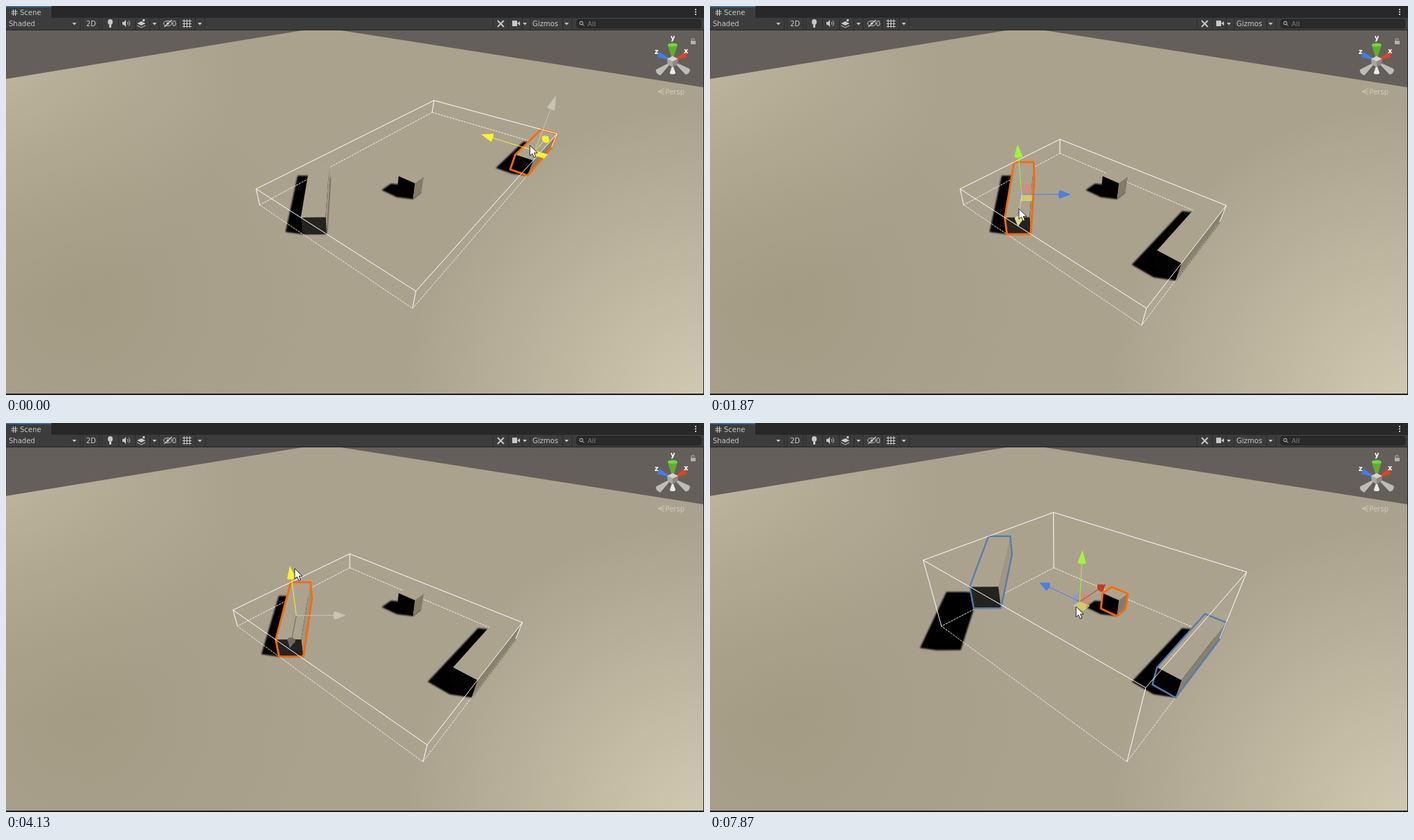
Write an HTML page with a canvas that moves like this. It is 1001 px wide and 559 px high and loops after 8 s.

```html
<!DOCTYPE html>
<html>
<head>
<meta charset="utf-8">
<style>
html, body { margin: 0; width: 100%; height: 100%; overflow: hidden; background: #282828; }
canvas { display: block; }
</style>
</head>
<body>
<canvas id="stage" width="1001" height="559"></canvas>
<script>
const W = 1001, H = 559, LOOP = 8000, STEP = 200 / 3;
const ctx = document.getElementById('stage').getContext('2d');
const YELLOW = '#fbf42c', FADED = '#c9c3b2', GREEN = '#a2f43c', BLUE = '#4a80e4', RED = '#c93b22';

// ---- helpers ----
const mix = (a, b, k) => a + (b - a) * k;
const add = (a, b, k = 1) => a.map((n, i) => n + b[i] * k);

// keys: [time, ...values], interpolated linearly
function track(keys, t) {
  const i = keys.findIndex(k => k[0] > t);
  if (i === 0) return keys[0].slice(1);
  if (i < 0) return keys[keys.length - 1].slice(1);
  const a = keys[i - 1], b = keys[i], k = (t - a[0]) / (b[0] - a[0]);
  return a.slice(1).map((n, j) => mix(n, b[j + 1], k));
}

// perspective camera: ground axes u, v and height z to stage pixels
const depth = ([u, v, z]) => 1 - .264 * u - .2373 * v - .1047 * z;
function project(p) {
  const [u, v, z] = p, w = depth(p);
  return [(493 + 45 * u - 239.8 * v - 52 * z) / w, (208 + 20.16 * u + 14.7 * v - 93 * z) / w];
}

function hull(points) {
  const sorted = [...points].sort((a, b) => a[0] - b[0] || a[1] - b[1]);
  const half = list => {
    const out = [];
    for (const p of list) {
      while (out.length > 1) {
        const [a, b] = out.slice(-2);
        if ((b[0] - a[0]) * (p[1] - a[1]) - (b[1] - a[1]) * (p[0] - a[0]) > 0) break;
        out.pop();
      }
      out.push(p);
    }
    return out.slice(0, -1);
  };
  return [...half(sorted), ...half(sorted.reverse())];
}

function path(points, close = true) {
  ctx.beginPath();
  points.forEach(p => ctx.lineTo(p[0], p[1]));
  if (close) ctx.closePath();
}
function fill(points, color) { path(points); ctx.fillStyle = color; ctx.fill(); }
function stroke(points, color, width = 1, close = false) {
  path(points, close);
  ctx.strokeStyle = color;
  ctx.lineWidth = width;
  ctx.stroke();
}
function rect(x, y, w, h, color) { ctx.fillStyle = color; ctx.fillRect(x, y, w, h); }
function disc(x, y, rx, ry, color, angle = 0) {
  ctx.beginPath();
  ctx.ellipse(x, y, rx, ry, angle, 0, 7);
  ctx.fillStyle = color;
  ctx.fill();
}
function text(s, x, y, color = '#c8c8c8', font = '10px') {
  ctx.font = font + ' "DejaVu Sans", sans-serif';
  ctx.fillStyle = color;
  ctx.fillText(s, x, y);
}

// ---- scenery ----
function glow(x, y, r, rgb, alpha) {
  const g = ctx.createRadialGradient(x, y, 0, x, y, r);
  g.addColorStop(0, `rgba(${rgb},${alpha})`);
  g.addColorStop(1, `rgba(${rgb},0)`);
  ctx.fillStyle = g;
  ctx.fillRect(0, 35, W, H);
}
function drawGround() {
  rect(0, 35, W, H, '#655f5b');
  ctx.save();
  path([[0, 105], [425, 35], [480, 35], [W, 117], [W, H], [0, H]]);
  ctx.clip();
  rect(0, 35, W, H, '#aba28e');
  glow(0, 100, 330, '190,181,157', .9);
  glow(110, 420, 330, '160,151,127', .6);
  glow(W, 570, 430, '212,203,179', .95);
  ctx.restore();
}

// ---- toolbar and view cube ----
const arrowDown = x => fill([[x - 3, 24], [x + 3, 24], [x, 27.5]], '#c4c4c4');
function drawToolbar() {
  const c = '#c8c8c8';
  rect(0, 0, W, 17, '#282828');
  rect(0, 0, 65, 17, '#3c3c3c');
  rect(0, 0, 65, 1.5, '#3a79bb');
  for (const d of [-1.5, 1.5]) {
    stroke([[12 + d, 5], [12 + d, 14]], c);
    stroke([[7.5, 9.5 + d], [16.5, 9.5 + d]], c);
  }
  text('Scene', 20, 13);
  for (const y of [4, 7.5, 11]) rect(988, y, 2, 2, c);
  rect(0, 17, W, 17, '#3c3c3c');
  rect(0, 34, W, 1, '#232323');
  for (const x of [106, 110, 133, 137, 161, 185, 206, 219, 247, 271, 285, 698, 720, 740, 751, 798, 811])
    rect(x, 17, 1, 17, '#2d2d2d');
  text('Shaded', 4, 29);
  text('2D', 115, 29);
  text('Gizmos', 755, 29);
  text('0', 238, 29);
  [98, 213, 278, 744, 804].forEach(arrowDown);
  // bulb
  disc(149.5, 23, 3.5, 4, c);
  rect(148, 27, 3, 4, c);
  // speaker
  fill([[167, 23], [169, 23], [172, 20], [172, 30], [169, 27], [167, 27]], c);
  for (const r of [2.5, 5]) {
    ctx.beginPath();
    ctx.arc(172.5, 25, r, -.9, .9);
    ctx.strokeStyle = c;
    ctx.stroke();
  }
  // layers
  fill([[188, 25], [194, 22], [200, 25], [194, 28]], c);
  stroke([[188, 28], [194, 31], [200, 28]], c);
  rect(196, 19, 3, 3, c);
  // struck-through eye
  ctx.beginPath();
  ctx.ellipse(232, 25, 6, 3.5, 0, 0, 7);
  ctx.stroke();
  disc(232, 25, 1.8, 1.8, c);
  stroke([[227, 30], [238, 20]], c, 1.4);
  // grid
  for (const d of [0, 4, 8]) {
    stroke([[255.5 + d, 19], [255.5 + d, 31]], c);
    stroke([[253, 21.5 + d], [266, 21.5 + d]], c);
  }
  // crossed tools
  stroke([[705, 21], [714, 30]], c, 2);
  stroke([[714, 21], [705, 30]], c, 2);
  // camera
  rect(726, 21, 7, 8, c);
  fill([[733, 25], [737, 22], [737, 28]], c);
  // search
  ctx.beginPath();
  ctx.roundRect(818.5, 19.5, 178, 12, 3);
  ctx.fillStyle = '#2a2a2a';
  ctx.fill();
  ctx.strokeStyle = '#212121';
  ctx.lineWidth = 1;
  ctx.stroke();
  ctx.beginPath();
  ctx.arc(825, 24.5, 2.3, 0, 7);
  ctx.strokeStyle = c;
  ctx.stroke();
  stroke([[826.5, 26], [829, 28.5]], c);
  text('All', 834, 29, '#808080', '9.5px');
}

// cone with its wide end at (x, y), pointing at (tx, ty)
function cone(x, y, tx, ty, r, squash, color) {
  const a = Math.atan2(ty - y, tx - x), nx = -Math.sin(a) * r, ny = Math.cos(a) * r;
  fill([[x + nx, y + ny], [x - nx, y - ny], [tx, ty]], color);
  disc(x, y, r * squash, r, color, a);
}
function drawViewCube() {
  const cx = 956, cy = 79;
  cone(956, 96, cx, 84, 4, .5, '#eeeae2');
  cone(937, 70, cx, cy, 4, .5, '#3f7fe8');
  cone(974, 70, cx, cy, 4, .5, '#dd4423');
  cone(936, 95, cx, cy, 5, .6, '#bdbcb8');
  cone(977, 94, cx, cy, 5, .6, '#bdbcb8');
  cone(956, 56, cx, cy, 7, .35, '#5fae2e');
  disc(956, 56, 7, 2.5, '#78d838');
  fill([[948, 76], [956, 72], [964, 76], [956, 80]], '#d5d3ce');
  fill([[948, 76], [956, 80], [956, 88], [949, 84]], '#a9a7a2');
  fill([[964, 76], [956, 80], [956, 88], [963, 84]], '#8b8984');
  text('y', 953, 49, '#fff', 'bold 10px');
  text('x', 972, 68, '#fff', 'bold 10px');
  text('z', 930, 69, '#fff', 'bold 10px');
  rect(982, 50, 7, 5, '#b5b0aa');
  stroke([[983, 50], [983, 47], [987, 47], [987, 49]], '#b5b0aa');
  const soft = '#d3ccbb';
  stroke([[944, 119], [935, 123], [944, 127]], soft);
  stroke([[936, 123], [944, 123]], soft);
  text('Persp', 945.5, 127, soft);
}

// ---- blocks ----
const TALL = .273, WIDE = .0934;
const LIGHT = [-.242, .187];

// base corners: near left, near right, far right, far left
const aligned = (u, v, len) => [[u - WIDE, v + len], [u, v + len], [u, v], [u - WIDE, v]];
const turned = (u, v) => [[.306, 1], [.38, .913], [.074, .488], [0, .575]].map(p => add(p, [u, v]));

function makeBlock(base, z, side, front) {
  const low = base.map(p => [...p, z]), high = base.map(p => [...p, z + TALL]);
  const all = [...low, ...high];
  const mid = add(add(low[0], low[2]), [0, 0, TALL]).map(n => n / 2);
  return { low, high, all, mid, side, front, outline: hull(all.map(project)) };
}
function drawShadow(b) {
  const spots = b.all.map(([u, v, z]) => project([u + z * LIGHT[0], v + z * LIGHT[1], 0]));
  fill(hull(spots), '#000');
}
function drawBlock({ low, high, side, front }) {
  const face = (points, color) => fill(points.map(project), color);
  face(high, '#aca38f');
  face([high[1], high[2], low[2], low[1]], side);
  face([high[0], high[1], low[1], low[0]], front);
}

// ---- bounding wireframe ----
function boundsOf(blocks) {
  const pts = blocks.flatMap(b => b.all);
  const pick = fn => [0, 1, 2].map(i => fn(...pts.map(p => p[i])));
  return [pick(Math.min), pick(Math.max)];
}
const ring = ([a, b], z) => [[a[0], a[1], z], [b[0], a[1], z], [b[0], b[1], z], [a[0], b[1], z]].map(project);

// ---- move handle ----
function drawHandle(pivot, right, near, mode) {
  const scale = depth(pivot), o = project(pivot);
  const tip = (axis, k) => project(add(pivot, axis, k * scale));
  const up = [0, 0, 1];
  const { blue, red } = handleAxes(right, near, mode.turned);
  const plane = mode.drag === 'plane', lift = mode.drag === 'lift';
  const quad = (a, b, color, line) => {
    const pts = [o, tip(a, .21), project(add(add(pivot, a, .21 * scale), b, .21 * scale)), tip(b, .21)];
    fill(pts, color);
    stroke(pts, line, 1, true);
  };
  if (plane) quad(right, near, YELLOW, YELLOW);
  else if (!lift) {
    quad(up, near, 'rgba(100,150,235,.3)', 'rgba(110,160,240,.6)');
    quad(up, right, 'rgba(240,120,100,.4)', 'rgba(240,120,100,.7)');
    quad(right, near, mode.hover ? 'rgba(235,230,80,.6)' : 'rgba(160,235,70,.25)', mode.hover ? '#d9d878' : '#b4e070');
  }
  const arrow = (axis, color) => {
    const a = tip(axis, .78), b = tip(axis, 1);
    const len = Math.hypot(b[0] - o[0], b[1] - o[1]);
    stroke([o, a], color);
    cone(a[0], a[1], b[0], b[1], 6, Math.sqrt(Math.max(.05, 1 - (len / 82) ** 2)) * .8, color);
  };
  arrow(blue, plane ? YELLOW : lift ? FADED : BLUE);
  arrow(red, plane ? YELLOW : lift ? '#6d6a62' : mode.hover && mode.turned ? '#e2d892' : RED);
  arrow(up, plane ? FADED : lift || mode.hoverUp ? YELLOW : GREEN);
}
const handleAxes = (right, near, isTurned) => isTurned
  ? { blue: right, red: near }
  : { blue: right.map(n => -n), red: near.map(n => -n) };

const U_AXIS = [.342, 0, 0], V_AXIS = [0, .355, 0];
const TURNED_RIGHT = [.222, -.261, 0], TURNED_NEAR = [.201, .279, 0];

// ---- choreography ----
const longKeys = [[0, .905, -1.14], [270, -.2, -1.5], [540, .5, -.5], [800, .938, .182], [870, .99, .15], [1130, 1, 0]];
const turnedKeys = [[2600, .049, -.113], [2930, .045, -.164], [3150, .03, -.5], [3470, 0, 0]];
const liftKeys = [[4200, 0], [4600, .727]];
const cursorKeys = [
  [1130, 694, 334], [1530, 443, 298], [1800, 443, 298], [1870, 443, 291], [2070, 443, 286],
  [2250, 443, 286], [2530, 454, 281], [2600, 454, 281],
  [3470, 421, 268], [3600, 411, 209], [3900, 411, 209], [4130, 414, 209], [4200, 414, 209],
  [4600, 400, 141], [4780, 400, 141], [4930, 462, 182],
  [6600, 150, 330], [7000, 525, 238], [7530, 525, 248], [7600, 525, 248], [7870, 525, 264]
];

function cursorAt(t, long, turnedBlock) {
  if (t < 1130) {
    const k = Math.min(1, t / 800), p = project(long.mid);
    return [p[0] + mix(-7, 4, k), p[1] + mix(-8, 6, k)];
  }
  if (t > 2600 && t < 3440) return add(project(turnedBlock.mid), [7, 10]);
  if (t > 6190 && t < 6590) return null;
  return t > 4930 && t < 6200 ? [462, 182] : track(cursorKeys, t);
}
function drawCursor([x, y]) {
  const shape = [[0, 0], [0, 15], [3.5, 12], [6, 17.5], [8.5, 16.5], [6.2, 11], [11, 11]];
  const pts = shape.map(p => add(p, [x, y]));
  fill(pts, '#fff');
  stroke(pts, '#222', 1, true);
}

function draw(t) {
  const [lu, lv] = track(longKeys, t), [tu, tv] = track(turnedKeys, t), [lift] = track(liftKeys, t);
  const long = makeBlock(aligned(lu, lv, .574), 0, '#89816f', '#020202');
  const slanted = makeBlock(turned(tu, tv), lift, '#9f9683', '#25231f');
  const cube = makeBlock(aligned(.561, .11, .101), 0, '#847c6b', '#020202');
  const blocks = [cube, slanted, long];
  const bounds = boundsOf(blocks);
  const floor = ring(bounds, 0), roof = ring(bounds, bounds[1][2]);

  ctx.lineJoin = 'round';
  drawGround();
  ctx.filter = 'blur(0.8px)';
  blocks.forEach(drawShadow);
  ctx.filter = 'none';
  ctx.setLineDash([3, 1.3]);
  stroke(floor, '#f4f1ea', 1, true);
  ctx.setLineDash([]);
  [...blocks].sort((a, b) => depth(b.mid) - depth(a.mid)).forEach(drawBlock);

  const ORANGE = '#ff6a00', CHILD = '#587db0';
  const active = t < 1590 ? long : t < 6390 ? slanted : cube;
  if (active === cube) [slanted, long].forEach(b => stroke(b.outline, CHILD, 2.4, true));
  stroke(active.outline, ORANGE, 2.8, true);

  stroke(roof, '#fff', 1, true);
  roof.forEach((p, i) => stroke([p, floor[i]], '#fff'));

  if (active === slanted) {
    drawHandle(slanted.mid, TURNED_RIGHT, TURNED_NEAR, {
      turned: true,
      drag: t > 2600 && t < 3440 ? 'plane' : t > 4120 && t < 4900 ? 'lift' : '',
      hover: t < 2600,
      hoverUp: t > 3590 && t < 4900
    });
  } else {
    const pivot = active === long ? long.mid : add(bounds[0], bounds[1]).map(n => n / 2);
    drawHandle(pivot, U_AXIS, V_AXIS, { drag: t < 1130 ? 'plane' : '', hover: t > 7000 });
  }

  drawViewCube();
  drawToolbar();
  rect(0, 557, W, 2, '#1c1c1c');
  rect(1000, 35, 1, H, '#242424');
  const tip = cursorAt(t, long, slanted);
  if (tip) drawCursor(tip);
}

function frame() {
  const t = performance.now() % LOOP;
  draw(Math.floor((t + 4) / STEP) * STEP);
  requestAnimationFrame(frame);
}
frame();
</script>
</body>
</html>
```
